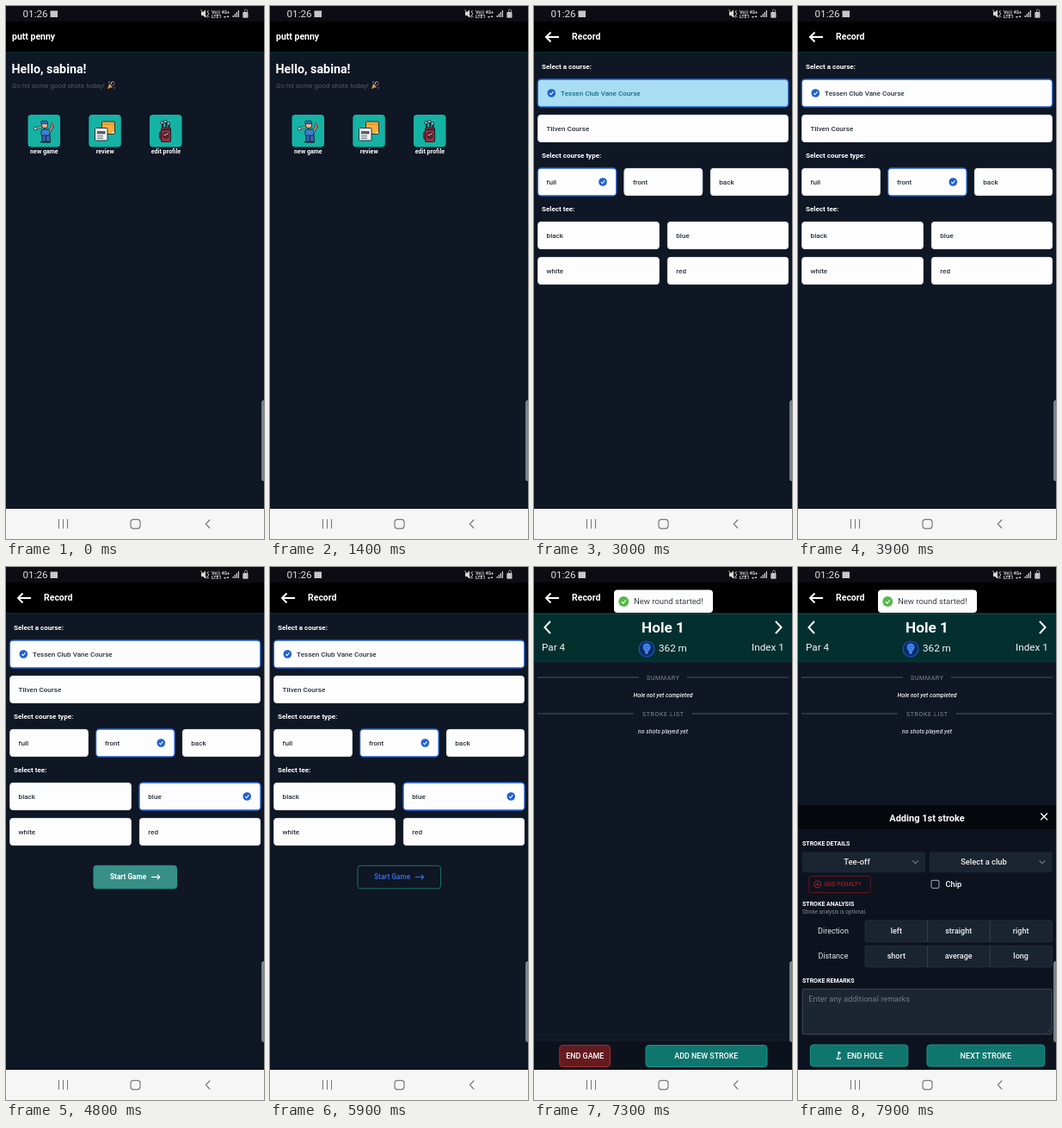
An HTML page with a canvas for the animation above (8 s loop, 300x618 px).

```html
<!DOCTYPE html>
<html lang="en">
<head>
<meta charset="utf-8">
<title>Golf score app</title>
<style>
  html, body { margin: 0; width: 100%; height: 100%; overflow: hidden; background: #0f1624; }
  canvas { display: block; width: 300px; height: 618px; }
</style>
</head>
<body>
<canvas id="stage"></canvas>
<script>
const W = 300, H = 618, LOOP = 8000;
const BG = '#0f1624', BLUE = '#2160d3', TEAL = '#0f766e';
const canvas = document.getElementById('stage');
const ctx = canvas.getContext('2d');
const dpr = window.devicePixelRatio || 1;
canvas.width = W * dpr;
canvas.height = H * dpr;

const clamp = v => Math.max(0, Math.min(1, v));
const ramp = (t, a, b) => clamp((t - a) / (b - a));
const easeOut = p => 1 - Math.pow(1 - p, 3);

function rect(x, y, w, h, fill) {
  ctx.fillStyle = fill;
  ctx.fillRect(x, y, w, h);
}

function box(x, y, w, h, r, fill, stroke, lw = 1) {
  ctx.beginPath();
  ctx.roundRect(x, y, w, h, r);
  if (fill) { ctx.fillStyle = fill; ctx.fill(); }
  if (stroke) { ctx.strokeStyle = stroke; ctx.lineWidth = lw; ctx.stroke(); }
}

function disc(x, y, r, fill, stroke, lw = 1) {
  ctx.beginPath();
  ctx.arc(x, y, r, 0, Math.PI * 2);
  if (fill) { ctx.fillStyle = fill; ctx.fill(); }
  if (stroke) { ctx.strokeStyle = stroke; ctx.lineWidth = lw; ctx.stroke(); }
}

// Polyline through x,y pairs
function line(color, lw, ...p) {
  ctx.beginPath();
  for (let i = 0; i < p.length; i += 2) ctx.lineTo(p[i], p[i + 1]);
  ctx.strokeStyle = color;
  ctx.lineWidth = lw;
  ctx.stroke();
}

function poly(fill, ...p) {
  ctx.beginPath();
  for (let i = 0; i < p.length; i += 2) ctx.lineTo(p[i], p[i + 1]);
  ctx.fillStyle = fill;
  ctx.fill();
}

function text(s, x, y, size, weight = 400, color = '#fff', align = 'left', spacing = 0) {
  ctx.font = `${weight} ${size}px Roboto, Arial, sans-serif`;
  ctx.letterSpacing = spacing + 'px';
  ctx.textAlign = align;
  ctx.fillStyle = color;
  ctx.fillText(s, x, y);
}
const mid = (s, x, y, size, weight, color, spacing) =>
  text(s, x, y, size, weight, color, 'center', spacing);

function check(x, y, r = 4.8, color = BLUE) {
  disc(x, y, r, color);
  line('#fff', 1.1, x - r * .42, y + r * .02, x - r * .1, y + r * .36, x + r * .45, y - r * .32);
}

function statusBar() {
  rect(0, 0, W, 18, '#0d0c12');
  text('01:26', 19.5, 13.4, 11.7, 400, '#dedede');
  rect(51.5, 5.5, 8.5, 7.5, '#c9c9c9');
  const c = '#d6d6d6';
  poly(c, 227, 7, 229, 7, 232, 4.5, 232, 13.5, 229, 11, 227, 11);
  line(c, 1, 226.5, 4.5, 234, 13.5);
  line(c, .9, 235.5, 5, 234.3, 7, 235.8, 9, 234.3, 11, 235.5, 13);
  text('Vo)) 4G+', 239, 8.6, 5.3, 700, c);
  text('LTE1', 239, 14, 5.3, 700, c);
  poly(c, 253, 12, 256, 12, 254.5, 14);
  poly(c, 256.5, 13, 259.5, 13, 258, 11);
  for (let i = 0; i < 4; i++) rect(263.5 + i * 2.1, 11 - i * 2, 1.2, 2 + i * 2, c);
  box(277.5, 4.2, 3, 4, 1.2, null, '#a9a9a9', .9);
  box(275.3, 7, 6.2, 6.8, 1, '#c4c4c4');
}

function navBar() {
  rect(0, 583, W, 35, '#f6f6f6');
  const c = '#7b7b7b';
  for (const x of [61.5, 66.5, 71.5]) line(c, 1.1, x, 595, x, 606);
  box(145, 595.3, 11, 10.5, 3, null, c, 1.2);
  line(c, 1.2, 237.2, 595.5, 232.3, 600.5, 237.2, 605.5);
  box(297, 457, 6, 94, 3, '#7a828a');
}

function header(title, back) {
  rect(0, 17, W, 37, '#000');
  rect(0, 53.3, W, .9, '#0d3d44');
  if (back) {
    line('#fff', 2, 29, 36, 14, 36);
    line('#fff', 2, 19.5, 30.5, 14, 36, 19.5, 41.5);
  }
  text(title, back ? 44 : 7, 39.4, 10.5, 700);
}

function golfer() {
  line('#1c2430', 2.4, 34, 143, 42, 139.5);
  line('#e8eef2', 1, 34, 143, 42, 139.5);
  disc(34.3, 142, 1.8, '#e8eef2', '#1c2430', .8);
  box(41, 143, 10, 8, 2, '#3d7fd6', '#1c2430');
  box(42, 150, 4.3, 8, 1, '#3467b4', '#1c2430');
  box(46.5, 150, 4.8, 8, 1, '#3467b4', '#1c2430');
  line('#1c2430', 3, 51, 145, 54, 139);
  line('#f0b48e', 1.6, 51, 145, 54, 139);
  line('#b63b44', 1.3, 52, 135, 56, 140);
  disc(45, 138, 3.7, '#f0b48e', '#1c2430', .9);
  box(40.5, 133.3, 8, 3.3, 1.5, '#416fc0', '#1c2430', .8);
  rect(40, 156.8, 12, 1.6, '#1c2430');
}

function notes() {
  box(111.5, 134, 15, 14.5, 1, '#f6b13c', '#26303a');
  rect(112, 136.6, 14, 1, '#d98a24');
  poly('#fbe0a0', 122, 148, 126, 144, 126, 148);
  box(103.5, 141.5, 14.5, 14.5, 1, '#f4f5f5', '#26303a');
  rect(106, 145, 9.5, 3.5, '#56616b');
  for (const y of [150.3, 152.8]) rect(106, y, 7, 1, '#56616b');
}

function golfBag() {
  for (const [x, y] of [[182, 135], [186, 133.5], [189.5, 136]]) {
    line('#1c2430', 2, x, y, x + .3, 142);
    box(x - 2.4, y - 1, 3.6, 2.8, 1, '#b9c4cc', '#1c2430', .9);
  }
  box(180.5, 141, 11, 16.5, 2, '#a32d3d', '#1c2430', 1.2);
  rect(180.5, 142.4, 11, 2, '#2b2431');
  box(183, 147, 6, 6, 1, '#61202f', '#1c2430', .9);
  line('#d8dde0', .9, 183.5, 150, 188.5, 148);
  box(178.4, 146, 2.2, 8, 1, '#712535', '#1c2430', .8);
}

function popper() {
  poly('#d6a04a', 118, 96, 120, 90, 124, 94);
  line('#8d6732', .8, 119.2, 93, 121.3, 95);
  line('#e8dfd0', .8, 122, 91, 123, 88, 124.5, 87.5);
  line('#b9645f', .9, 123.5, 92.5, 125, 91, 126.5, 92);
  disc(120, 88.3, .7, '#c6cbd2');
  disc(125.8, 89, .7, '#d5b653');
  disc(126, 95, .7, '#7d97c8');
}

function home() {
  rect(0, 0, W, H, BG);
  header('putt penny', false);
  text('Hello, sabina!', 6.5, 78.3, 14.3, 700);
  text('Go hit some good shots today!', 7, 95, 7.95, 400, '#555960');
  popper();
  const tiles = [['new game', 25.5, golfer], ['review', 96.3, notes], ['edit profile', 167, golfBag]];
  for (const [label, x, icon] of tiles) {
    box(x, 126, 37.5, 37.5, 4, '#14b3a4');
    icon();
    mid(label, x + 18.9, 170.6, 7.1, 700);
  }
}

// at: tap time of the card; flash is the fading press colour
function card(t, label, x, y, w, at, until = Infinity, left = false) {
  const on = t >= at && t < until;
  const flash = on && at > 0 ? 1 - ramp(t, at + 200, at + 400) : 0;
  box(x, y, w, 32, 4, '#fdfdfd');
  if (flash) {
    ctx.save();
    ctx.globalAlpha *= flash;
    box(x, y, w, 32, 4, '#a9ddf2');
    ctx.restore();
  }
  if (on) {
    box(x, y, w, 32, 4, null, BLUE, 1.3);
    left ? check(x + 16, y + 16) : check(x + w - 15.8, y + 16);
  } else {
    box(x + .4, y + .4, w - .8, 31.2, 4, null, '#d9dde2', .8);
  }
  text(label, x + (on && left ? 26.8 : 10.3), y + 19, 8.1, 500, flash > .5 ? '#167086' : '#29323d');
}

function startButton(pressed) {
  box(102, 346.3, 96.5, 26.5, 3, pressed ? null : '#388f88', pressed ? '#127468' : '#239c8c', 1);
  const c = pressed ? '#2a68dc' : '#fff';
  text('Start Game', 121, 362, 8.3, 700, c);
  line(c, 1.2, 169, 359.5, 178.5, 359.5);
  line(c, 1.2, 176, 357, 178.7, 359.5, 176, 362);
}

function setup(t) {
  rect(0, 0, W, H, BG);
  header('Record', true);
  text('Select a course:', 9, 73, 8.05, 700);
  card(t, 'Tessen Club Vane Course', 4.3, 85, 291.5, 2900, Infinity, true);
  card(t, 'Tilven Course', 4.3, 126, 291.5, Infinity);
  text('Select course type:', 9, 176, 8.05, 700);
  card(t, 'full', 4.3, 188, 91.5, 0, 3500);
  card(t, 'front', 104.6, 188, 91.5, 3500);
  card(t, 'back', 205, 188, 91, Infinity);
  text('Select tee:', 9, 238, 8.05, 700);
  card(t, 'black', 4.3, 250, 141.5, Infinity);
  card(t, 'blue', 155, 250, 141, 4200);
  card(t, 'white', 4.3, 291, 141.5, Infinity);
  card(t, 'red', 155, 291, 141, Infinity);
  if (t >= 4200) startButton(t >= 5700);
}

function divider(label, y, half) {
  rect(4, y - .5, 146 - half, 1, '#465664');
  rect(150 + half, y - .5, 146 - half, 1, '#465664');
  mid(label, 150.3, y + 2.7, 7, 400, '#858c95', .65);
}

function button(label, x, y, w, fill, stroke, cx, size = 8.9) {
  box(x, y, w, 25, 3.5, fill, stroke, 1);
  mid(label, cx, y + 15.6, size, 500);
}

function hole() {
  rect(0, 0, W, H, BG);
  header('Record', true);
  rect(0, 54, W, 56, '#042f2f');
  rect(0, 54, W, .8, '#0e4d4b');
  rect(0, 109.4, W, .8, '#0b3d40');
  line('#fff', 2, 19, 63, 12.5, 70, 19, 77);
  line('#fff', 2, 281, 63, 287.5, 70, 281, 77);
  mid('Hole 1', 150, 76, 17.2, 700);
  text('Par 4', 9, 97.3, 11.7, 400, '#f3f5f5');
  text('362 m', 145, 98.3, 11.7, 400, '#f3f5f5');
  text('Index 1', 291, 97.3, 11.8, 400, '#f3f5f5', 'right');
  disc(131, 95, 9, '#0c2c66', '#1d56bd', 1.1);
  disc(131, 93, 4.5, '#3f83ee');
  poly('#3f83ee', 128.7, 97, 133.3, 97, 132.2, 101, 129.8, 101);
  for (const [x, y] of [[129.5, 92], [132.5, 92], [131, 94.5]]) disc(x, y, .6, '#153f87');
  divider('SUMMARY', 128, 28);
  mid('Hole not yet completed', 150, 151, 6.85, 'italic 500', '#f2f4f6');
  divider('STROKE LIST', 170, 34);
  mid('no shots played yet', 150, 193, 6.9, 'italic 500', '#d5d8dc');
  rect(0, 549, W, 34, '#0c121c');
  rect(0, 548.6, W, .8, '#1d2733');
  button('END GAME', 29.8, 554.5, 58.7, '#641b20', '#a8292f', 59.3);
  button('ADD NEW STROKE', 130, 554.5, 141, TEAL, '#16988a', 200.3);
}

function toast(p) {
  ctx.save();
  ctx.beginPath();
  ctx.rect(0, 17, W, H);
  ctx.clip();
  ctx.translate(0, (1 - p) * -38);
  box(93, 26.5, 115, 26.5, 4, '#fdfdfd');
  check(104.3, 40, 6, '#55b948');
  text('New round started!', 116, 43.3, 9.5, 400, '#3b4048');
  ctx.restore();
}

function choices(label, y, names) {
  mid(label, 41, y + 15, 9, 400, '#e4e6e9');
  box(78, y, 217.5, 24.5, 2, '#1a2431', '#2a3542', .7);
  names.forEach((name, i) => {
    if (i) rect(77.7 + i * 72.5, y, .8, 24.5, '#3a4653');
    mid(name, 114.3 + i * 72.4, y + 15, 9, 500, '#eef0f2');
  });
}

function sheet(dy) {
  ctx.save();
  ctx.translate(0, dy);
  rect(0, 276, W, 310, '#0d131e');
  rect(0, 276, W, 28, '#05080d');
  mid('Adding 1st stroke', 150, 294.5, 11, 700);
  line('#fff', 1.3, 282.3, 285.5, 290, 293.2);
  line('#fff', 1.3, 290, 285.5, 282.3, 293.2);

  text('STROKE DETAILS', 5, 323, 7, 700);
  for (const [label, x, w, cx, chev] of [['Tee-off', 5, 143, 68.5, 136.5], ['Select a club', 152.8, 142.7, 216, 284]]) {
    box(x, 330.3, w, 24, 2, '#1b2532');
    mid(label, cx, 345.2, 9.4, 500, '#eef0f2');
    line('#697380', 1.1, chev - 3.3, 340.5, chev, 343.7, chev + 3.3, 340.5);
  }

  box(12.7, 358.5, 71.5, 19, 2, null, '#641a20', .9);
  disc(22.8, 368, 4, null, '#b3222a', .9);
  line('#b3222a', .9, 20.8, 368, 24.8, 368);
  line('#b3222a', .9, 22.8, 366, 22.8, 370);
  text('ADD PENALTY', 30.3, 370.4, 6.8, 400, '#b3222a');
  box(155, 363.3, 9, 9, 1.5, null, '#8b929b', 1.2);
  text('Chip', 171.5, 371.3, 9.3, 500);

  text('STROKE ANALYSIS', 5, 393, 7, 700);
  text('Stroke analysis is optional.', 5, 402.3, 6.3, 400, '#848b95');
  choices('Direction', 410, ['left', 'straight', 'right']);
  choices('Distance', 439.3, ['short', 'average', 'long']);

  text('STROKE REMARKS', 5, 482, 7, 700);
  box(5.2, 489.3, 290, 52.5, 2, '#1c2632', '#46515d', .9);
  text('Enter any additional remarks', 12.3, 504.3, 9.3, 400, '#707985');
  line('#59636e', .7, 289.5, 540, 293.5, 536);

  button('END HOLE', 14.3, 554, 113.5, TEAL, '#16988a', 78, 9);
  line('#fff', 1, 47, 562, 47, 570);
  poly('#fff', 47, 561.5, 50.2, 563.4, 47, 565.3);
  line('#fff', .9, 45, 568.5, 45, 570.5, 49.5, 570.5, 49.5, 568.5);
  button('NEXT STROKE', 150, 554, 136.7, TEAL, '#16988a', 218.3, 9.2);
  ctx.restore();
}

function faded(alpha, draw) {
  if (alpha <= 0) return;
  ctx.save();
  ctx.globalAlpha = alpha;
  draw();
  ctx.restore();
}

function render(t) {
  ctx.setTransform(dpr, 0, 0, dpr, 0, 0);
  if (t < 2100) home();
  if (t < 6100) faded(ramp(t, 1850, 2050), () => setup(t));
  faded(ramp(t, 5960, 6080), hole);
  if (t >= 7400) sheet(307 * (1 - easeOut(ramp(t, 7400, 7800))));
  if (t >= 6100) toast(easeOut(ramp(t, 6100, 6350)));
  statusBar();
  navBar();
}

const begin = performance.now();
function tick() {
  render((performance.now() - begin) % LOOP);
  requestAnimationFrame(tick);
}
tick();
</script>
</body>
</html>
```
